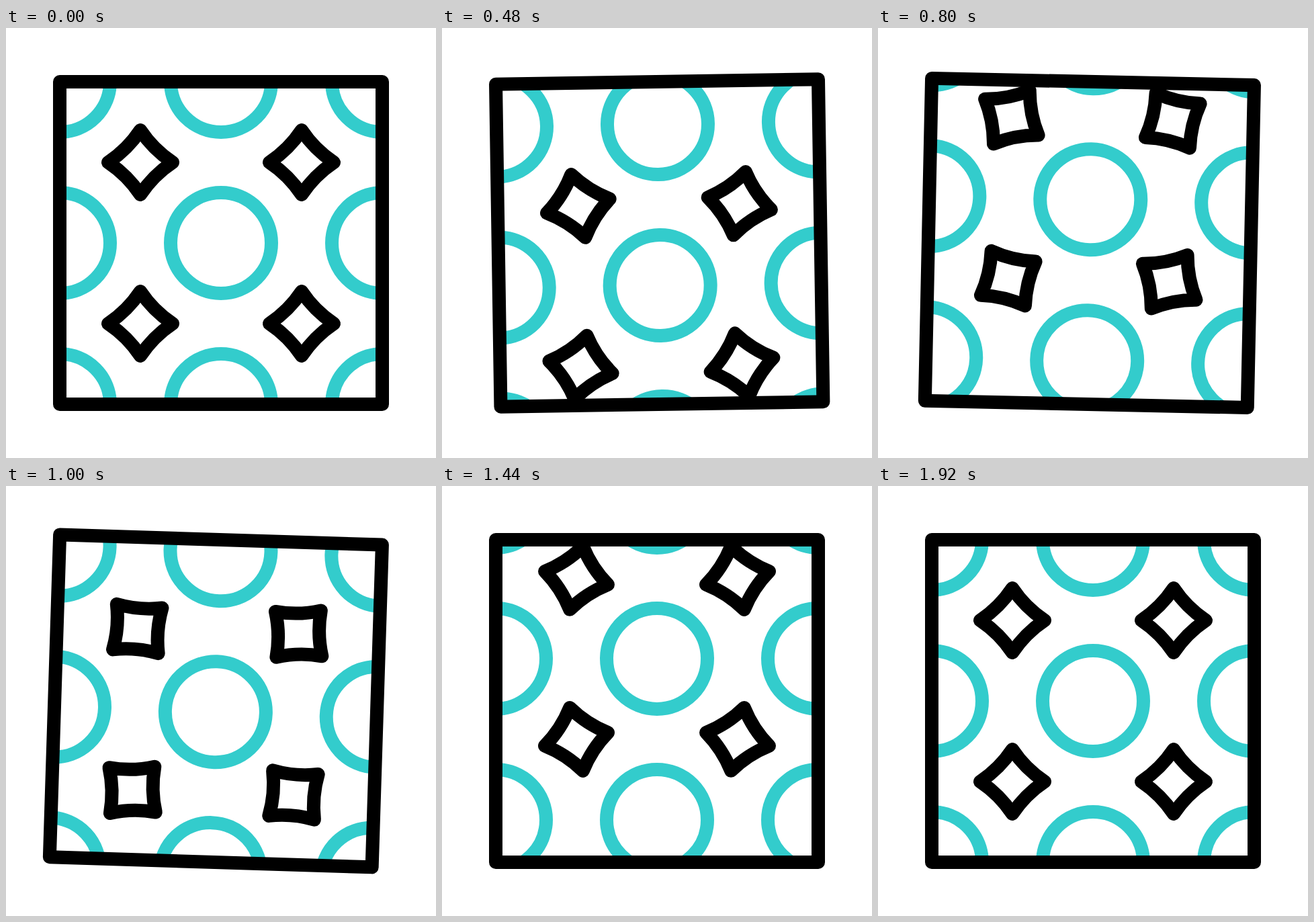
An HTML page without scripts that plays this animation: 640x640 px, repeating every 2 s.

```html
<!DOCTYPE html>
<html lang="en">
<head>
<meta charset="utf-8">
<title>Swinging pattern tile</title>
<style>
  /* --n is a clock: 50 ticks of 40 ms per loop */
  @property --n {
    syntax: "<number>";
    inherits: true;
    initial-value: 0;
  }
  @keyframes clock {
    from { --n: 0; }
    to { --n: 50; }
  }
  html, body {
    margin: 0;
    width: 100%;
    height: 100%;
    overflow: hidden;
    background: #fff;
  }
  svg {
    display: block;
    width: 100%;
    height: 100%;
    animation: clock 2s steps(50) -1ms infinite;
  }

  /* Damped swing from the middle of the top edge: 7, -6, 3, 0 degrees */
  .swing {
    --a: clamp(0, (var(--n) - 2) / 6, 1);
    --b: clamp(0, (var(--n) - 8) / 7, 1);
    --c: clamp(0, (var(--n) - 15) / 7, 1);
    --d: clamp(0, (var(--n) - 22) / 7, 1);
    transform-origin: 320px 80px;
    transform: rotate(calc(1deg * (
      7 * var(--a) * var(--a) * (3 - 2 * var(--a))
      - 13 * var(--b) * var(--b) * (3 - 2 * var(--b))
      + 9 * var(--c) * var(--c) * (3 - 2 * var(--c))
      - 3 * var(--d) * var(--d) * (3 - 2 * var(--d)))));
  }

  /* Smooth scroll by two rows while the stars make a quarter turn */
  .scroll, .star {
    --s: clamp(0, (var(--n) - 2) / 44, 1);
    --p: (var(--s) * var(--s) * (3 - 2 * var(--s)));
  }
  .scroll { transform: translateY(calc(480px * var(--p))); }
  .star {
    transform-origin: 0 0;
    transform: rotate(calc(90deg * var(--p)));
  }
  .ccw { transform: rotate(calc(-90deg * var(--p))); }

  .line {
    fill: none;
    stroke: #000;
    stroke-width: 20;
    stroke-linejoin: round;
  }
  .ring { stroke: #3cc; }
</style>
</head>
<body>
<svg viewBox="0 0 640 640">
  <defs>
    <clipPath id="inside"><rect x="86" y="86" width="468" height="468"/></clipPath>
    <path id="star" d="M0-48Q19.2-19.2 48 0Q19.2 19.2 0 48Q-19.2 19.2-48 0Q-19.2-19.2 0-48Z"/>
    <g id="rings">
      <circle cx="80" r="75"/>
      <circle cx="320" r="75"/>
      <circle cx="560" r="75"/>
    </g>
  </defs>
  <g class="swing">
    <g clip-path="url(#inside)">
      <g class="scroll">
        <g class="line ring">
          <use href="#rings" y="-400"/>
          <use href="#rings" y="-160"/>
          <use href="#rings" y="80"/>
          <use href="#rings" y="320"/>
          <use href="#rings" y="560"/>
        </g>
        <g class="line">
          <g transform="translate(200 -280)"><use href="#star" class="star ccw"/></g>
          <g transform="translate(440 -280)"><use href="#star" class="star"/></g>
          <g transform="translate(200 -40)"><use href="#star" class="star"/></g>
          <g transform="translate(440 -40)"><use href="#star" class="star ccw"/></g>
          <g transform="translate(200 200)"><use href="#star" class="star ccw"/></g>
          <g transform="translate(440 200)"><use href="#star" class="star"/></g>
          <g transform="translate(200 440)"><use href="#star" class="star"/></g>
          <g transform="translate(440 440)"><use href="#star" class="star ccw"/></g>
        </g>
      </g>
    </g>
    <rect class="line" x="80" y="80" width="480" height="480"/>
  </g>
</svg>
</body>
</html>
```
